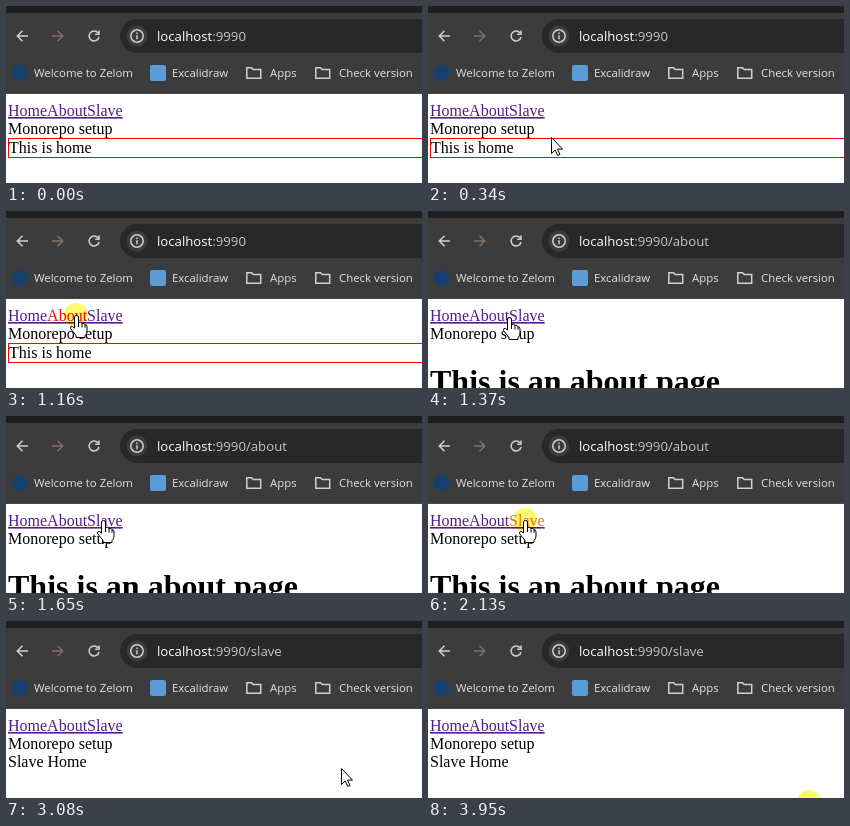
Write an HTML page that moves like this. It is 416 px wide and 177 px high and loops after 4.08 s.

```html
<!DOCTYPE html>
<html lang="en">
<head>
<meta charset="utf-8">
<title>Routing demo</title>
<style>
  html, body { margin: 0; width: 100%; height: 100%; overflow: hidden; background: #fff; }
  svg { display: block; width: 416px; height: 177px; }
  .ui { font-family: "Open Sans", "Noto Sans", sans-serif; font-size: 11.4px; fill: #e3e3e3; }
  .url { font-size: 13.2px; fill: #c7c7c7; }
  .url .host { fill: #fff; }
  .page { font: 16px "Liberation Serif", "Times New Roman", serif; fill: #000; }
  .links { text-decoration: underline; fill: #551a8b; }
  .title { font-size: 32px; font-weight: bold; }
  .icon { fill: none; stroke: #d0d0d0; stroke-width: 1.5; }
  .cursor { fill: #fff; stroke: #000; stroke-linejoin: round; }
  #ring { fill: #fff86c; mix-blend-mode: multiply; }
</style>
</head>
<body>
<svg viewBox="0 0 416 177">
  <rect width="416" height="88" fill="#3c3c3c"/>
  <rect width="416" height="7" fill="#1f1f1f"/>
  <rect y="87" width="416" height="1" fill="#474747"/>
  <rect x="114" y="13" width="340" height="34" rx="17" fill="#282828"/>
  <circle cx="131" cy="30" r="10.5" fill="#3c3c3c"/>
  <circle cx="13.5" cy="67" r="8" fill="#17406f"/>
  <rect x="144" y="59" width="16" height="16" rx="2" fill="#5b9bd8"/>

  <g class="icon">
    <path d="M22 30H11.500M16.500 24.800 11.300 30l5.200 5.200"/>
    <path d="M46 30h10.500M51.500 24.800 56.700 30l-5.200 5.200" stroke="#86705f"/>
    <path d="M92 26.800A5 5 0 1 0 93 31M93 24.500v3.800h-3.800"/>
    <path id="folder" d="M240.800 72.200v-10.400h4.700l1.700 1.800h7.500v8.600z"/>
    <use href="#folder" x="69"/>
    <circle cx="131" cy="30" r="6.200"/>
    <path d="M131 29.300v4M131 26.400v1.500"/>
  </g>

  <g class="ui">
    <text class="url" x="151" y="35"><tspan class="host">localhost</tspan>:9990<tspan id="path"></tspan></text>
    <text x="28" y="71">Welcome to Zelom</text>
    <text x="166" y="71">Excalidraw</text>
    <text x="264" y="71">Apps</text>
    <text x="333" y="71">Check version</text>
  </g>

  <g class="page">
    <text class="links" x="2" y="110">Home<tspan id="about">About</tspan><tspan id="slave">Slave</tspan></text>
    <text x="2" y="128">Monorepo setup</text>
    <g class="view">
      <rect x="2.5" y="132.5" width="420" height="19" fill="none" stroke="#f00"/>
      <text x="3" y="147">This is home</text>
    </g>
    <text class="view title" x="2" y="181">This is an about page</text>
    <text class="view" x="2" y="146">Slave Home</text>
  </g>

  <circle id="ring" r="12"/>
  <g id="cursor" class="cursor">
    <path id="arrow" d="M.5.5V16.500l3.700-3.500 2.500 5.500 2.300-1-2.500-5.400h5z"/>
    <g id="hand">
      <path d="M-1.500 13V2Q-1.500.5.5.5T2.500 2V7.500Q5 6.500 6 8.500 8.200 7.500 9 9.700 11 9.500 11 12V16Q11 19 9 20.500V22.500H0V20.500L-5.500 13.500Q-6 11-3.500 11.500Z"/>
      <path d="M2.500 7v5M6 8.500v4M9 9.700v3" fill="none"/>
    </g>
  </g>
</svg>
<script>
const LOOP = 4080, STEP = 70, HOLD = 140;
const $ = id => document.getElementById(id);
const views = document.querySelectorAll('.view');
const paths = ['', '/about', '/slave'];

// Pointer waypoints: time, x, y
const way = [
  [0, 430, 190], [70, 241, 154], [480, 10, 110], [550, 45, 110], [670, 67, 111],
  [810, 84, 108], [1020, 70, 104], [1160, 70, 104], [1370, 81, 106], [1650, 97, 104],
  [2660, 97, 104], [3080, 335, 147], [3420, 381, 181], [LOOP, 381, 181]
];

function pointer(t) {
  const i = way.findLastIndex(w => w[0] <= t);
  const [t0, x0, y0] = way[i], [t1, x1, y1] = way[i + 1];
  const k = Math.floor((t - t0) / STEP) * STEP / (t1 - t0);
  return [x0 + (x1 - x0) * k, y0 + (y1 - y0) * k].map(Math.round);
}

const between = (t, from, length) => t >= from && t < from + length;
const show = (el, on) => el.style.display = on ? '' : 'none';

let begin;
function draw(now) {
  begin ??= now;
  const t = (now - begin) % LOOP;
  const [x, y] = pointer(t);
  const page = t < 1160 + STEP ? 0 : t < 2130 + STEP ? 1 : 2;
  const overLink = x < 117 && y < 114;

  views.forEach((v, i) => show(v, i === page));
  $('path').textContent = paths[page];
  $('about').style.fill = between(t, 1160, STEP) ? '#f00' : '';
  $('slave').style.fill = between(t, 2130, STEP) ? '#e8722c' : '';

  for (const id of ['cursor', 'ring']) $(id).setAttribute('transform', `translate(${x} ${y})`);
  show($('hand'), overLink);
  show($('arrow'), !overLink);
  show($('ring'), [1160, 2130, 3950].some(click => between(t, click, HOLD)));
  requestAnimationFrame(draw);
}
requestAnimationFrame(draw);
</script>
</body>
</html>
```
